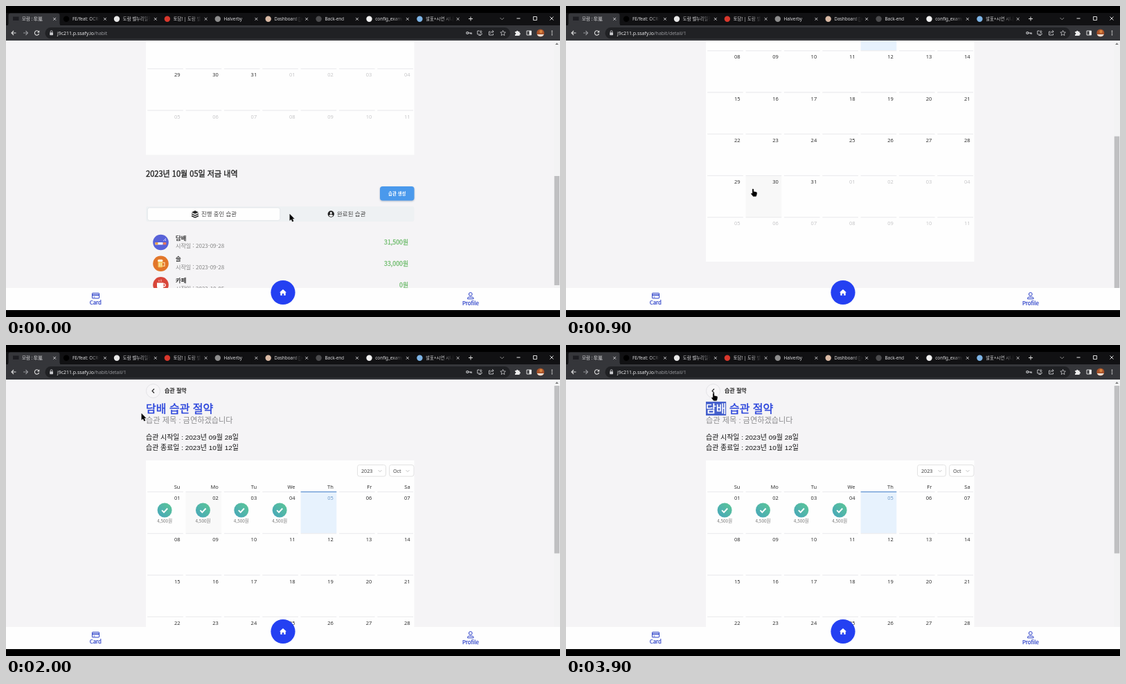
These frames come from a looping animation (800 px wide and 450 px high, 4 s). An HTML page:

```html
<!DOCTYPE html>
<html lang="ko">
<head>
<meta charset="utf-8">
<title>Habit savings</title>
<style>
html, body { margin: 0; width: 100%; height: 100%; overflow: hidden; background: #000; }
svg { display: block; width: 800px; height: 450px; }
text { font-family: 'Noto Sans CJK KR', 'Noto Sans', sans-serif; white-space: pre; }
.ui { font-family: 'Noto Sans', 'Noto Sans CJK KR', sans-serif; }
.doc { font-family: 'Liberation Sans', 'Noto Sans CJK KR', sans-serif; }
.raised { filter: drop-shadow(0 1px 1.2px rgba(40, 70, 110, .35)); }
</style>
</head>
<body>
<svg id="stage" viewBox="0 0 800 450" xmlns="http://www.w3.org/2000/svg"></svg>
<script>
const LOOP = 4000, STEP = 100;
const BLUE = '#2c46dc', NAV = '#2a3fc8', PAGE = '#f5f4f6', INK = '#222', STRIP = '#111113', BAR = '#35363a';

// Drawing helpers; text is placed by its vertical middle.
const rect = (x, y, w, h, fill, more = '') =>
  `<rect x="${x}" y="${y}" width="${w}" height="${h}" fill="${fill}" ${more}/>`;
const disc = (x, y, r, fill, more = '') =>
  `<circle cx="${x}" cy="${y}" r="${r}" fill="${fill}" ${more}/>`;
const line = (d, color, w = 1, more = '') =>
  `<path d="${d}" fill="none" stroke="${color}" stroke-width="${w}" ${more}/>`;
const fill = (d, color, more = '') => `<path d="${d}" fill="${color}" ${more}/>`;
const text = (x, y, size, str, color = INK, more = '') =>
  `<text x="${x}" y="${(y + size * 0.36).toFixed(2)}" font-size="${size}" fill="${color}" ${more}>${str}</text>`;
// Medium weight: regular glyphs with a hairline outline.
const medium = (x, y, size, str, color = INK, more = '') =>
  text(x, y, size, str, color, `stroke="${color}" stroke-width="${size * 0.03}" ${more}`);
const at = (x, y, body) => `<g transform="translate(${x} ${y})">${body}</g>`;
const END = 'text-anchor="end"', MID = 'text-anchor="middle"';
const UI = 'class="ui"', DOC = 'class="doc"';
const two = n => String(n).padStart(2, '0');

// Calendar grid, placed for the detail page at scroll 0.
const COL = 55.35, ROW = 60.25;
const cellX = c => 204.2 + c * COL;
const cellY = r => 212.5 + r * ROW;

function calendar(detail) {
  let s = rect(202, 167, 387.5, 411, '#fefefe');
  s += rect(507.5, 173.5, 41, 16.5, '#fff', 'rx="3" stroke="#e2e2e2"');
  s += rect(553.5, 173.5, 35.5, 16.5, '#fff', 'rx="3" stroke="#e2e2e2"');
  s += text(513, 182, 7.2, '2023', '#444', UI) + text(559, 182, 7.2, 'Oct', '#444', UI);
  for (const x of [540, 580]) s += line(`M${x - 2.5} 181l2.5 2.5 2.5-2.5`, '#bbb', 0.9);
  ['Su', 'Mo', 'Tu', 'We', 'Th', 'Fr', 'Sa'].forEach((d, c) => {
    s += text(cellX(c) + 47.3, 205, 7.5, d, '#333', UI + ' ' + END);
  });
  for (let i = 0; i < 42; i++) {
    const c = i % 7, x = cellX(c), y = cellY(i / 7 | 0);
    const now = i === 4, out = i > 30;
    if (now) s += rect(x, y, 51.7, 60, '#e7f2fd');
    if (detail && [1, 15, 29].includes(i)) s += rect(x, y, 51.7, 60, '#f5f5f5', `id="day${i + 1}" opacity="0"`);
    s += rect(x, y - 0.6, 51.7, 1.2, now ? '#5a8fd0' : '#ececee');
    s += text(x + 47.3, y + 9, 7.5, two(out ? i - 30 : i + 1),
      now ? '#6f9ccb' : out ? '#c6c6c8' : '#333', UI + ' ' + END);
    if (detail && i < 4) {
      const cx = x + 24.9;
      s += disc(cx, y + 26.5, 10.5, 'url(#mint)');
      s += line(`M${cx - 4} ${y + 26.7}l2.9 2.9 5.2-5.6`, '#fff', 1.9);
      s += text(cx, y + 42, 6.4, '4,500원', '#777', MID);
    }
  }
  return s;
}

const button = (x, y, w, label) =>
  rect(x, y, w, 20.6, '#4a99ec', 'rx="4" class="raised"') +
  text(x + w / 2, y + 10.3, 6.4, label, '#fff', MID + ' font-weight="700"');

const smoke = rect(-8, 0, 11, 3.4, '#fff') + rect(-8, 0, 4, 3.4, '#f0a24a') + rect(3.4, 0, 4.4, 3.4, '#e9775a') +
  line('M4-2c0-2 3-1 3-4M7-2v-2', '#cfd2ff', 0.9);
const beer = rect(-4, -4.5, 6.5, 10, '#f6c65a', 'rx="1"') + rect(-4.5, -6, 7.5, 3.4, '#fff4dc', 'rx="1.7"') +
  line('M2.5-1.5h3v5h-3M-2-1v5M.5-1v5', '#ffe9bd', 1.1);
const cup = fill('M-5.5-3h9.5v5c0 3-2 4-4.7 4s-4.8-1-4.8-4z', '#fff') +
  line('M4-1.5c4-.5 3.5 4.5-.3 4.2', '#fff', 1.2) + line('M-2.5-4.5v-2.5M.5-4.5v-3.2', '#ffd8d0', 0.9);

function habitPage() {
  let s = at(0, -362.7, calendar(false));
  s += medium(202, 243, 11.05, '2023년 10월 05일 저금 내역');
  s += button(540, 261, 49.5, '습관 생성');
  s += rect(202, 290, 387.5, 22, '#eef1f3', 'rx="3"');
  s += rect(204.3, 291.8, 191.5, 18.6, '#fefefe', 'rx="3" stroke="#dfe3e6" stroke-width=".8"');
  s += fill('M273 296l5 2.4-5 2.4-5-2.4zM268 300l5 2.4 5-2.4v1.6l-5 2.4-5-2.4zM268 302.8l5 2.4 5-2.4v1.6l-5 2.4-5-2.4z', INK);
  s += text(282, 301, 8.4, '진행 중인 습관', '#444');
  s += disc(469.3, 301, 4.7, INK) + disc(469.3, 299.4, 1.5, '#fff') +
    fill('M466.3 303.6c1-2.4 5-2.4 6 0-1.6 1.8-4.4 1.8-6 0z', '#fff');
  s += text(478, 301, 8.5, '완료된 습관', '#444');
  [['담배', '09-28', '31,500원', '#5862d8', smoke],
   ['술', '09-28', '33,000원', '#e2762a', beer],
   ['카페', '10-05', '0원', '#d8463a', cup]].forEach(([name, day, sum, color, icon], i) => {
    const y = 342 + i * 30.7;
    s += disc(223.5, y, 11.3, color) + at(223.5, y, icon);
    s += medium(245, y - 6.3, 8.3, name);
    s += text(245, y + 5.4, 8.05, '시작일 : 2023-' + day, '#858585');
    s += medium(581, y, 8.8, sum, '#6dbb6b', END);
  });
  return s + button(342.5, 425, 106.5, '오늘 습관으로 아낀 돈 저금하기');
}

function detailPage() {
  const title = color => medium(202, 92, 16, '담배 습관 절약', color);
  return disc(212.5, 66.5, 10, '#f7f6f8', 'stroke="#e3e3e6"') +
    line('M214 63.5l-3 3 3 3', INK, 1.1) +
    text(229, 66.3, 8, '습관 절약', INK, 'font-weight="700"') +
    title(BLUE) +
    `<g clip-path="url(#picked)">${rect(202, 82, 29.4, 20, '#4560cc')}${title('#fff')}</g>` +
    text(202, 109, 11.2, '습관 제목 : 금연하겠습니다', '#8c8c8e', DOC) +
    text(202, 133.7, 9.95, '습관 시작일 : 2023년 09월 28일', '#111', DOC) +
    text(202, 148.7, 9.95, '습관 종료일 : 2023년 10월 12일', '#111', DOC) +
    calendar(true);
}

const cross = (x, y, r, c) => line(`M${x - r} ${y - r}l${2 * r} ${2 * r}m0 ${-2 * r}l${-2 * r} ${2 * r}`, c, 0.9);

function tabs() {
  let s = rect(0, 0, 800, 10, '#000') + rect(0, 10, 800, 18, STRIP) + rect(0, 28, 800, 22, BAR);
  s += fill('M1 28.5q2.5-.5 2.5-3v-12q0-3 3-3h68q3 0 3 3v12q0 2.5 2.5 3z', BAR);
  [['모람 : 牟嵐', '#1d1d22'], ['FE/feat: OCR구현', '#000'], ['도람 벨누리일정', '#e8e8e8'],
   ['토담! | 도람 벨', '#d8372c'], ['Halverby', '#8d8d8d'], ['Dashboard [Jenkins]', '#d9b9a4'],
   ['Back-end', '#4a4a4c'], ['config_example', '#f2f2f2'], ['발표+시연 시나리오', '#7db4e6']].forEach(([name, color], i) => {
    const x = 14.2 + i * 72.9, end = x + 55.2 - i * 0.1;
    s += i === 0 ? rect(10, 15.5, 8.5, 5.5, color) : disc(x, 18.8, 4.2, color);
    s += text(x + 8.8, 18.6, 6.4, name, '#dcdcde', UI);
    if (i) s += rect(end - 21, 11, 15, 16, 'url(#fade)') + rect(end - 6.2, 11, 23, 16, STRIP);
    s += cross(end + 0.8, 18.8, 1.9, '#d6d6d8');
  });
  s += line('M668 18.5h6M671 15.5v6', '#ddd') + line('M713.5 17l2.8 2.8 2.8-2.8', '#999', 0.9);
  return s + line('M737.5 18h5', '#eee') + line('M761.5 15.5h5v5h-5z', '#eee', 0.9) + cross(788, 18, 2.5, '#eee');
}

function toolbar() {
  const g = '#c9cacd';
  let s = line('M14.5 39h-6.5m3-3l-3 3 3 3', '#ddd', 1.1) + line('M25 39h6.5m-3-3l3 3-3 3', '#929397', 1.1);
  s += line('M47.2 37.2a3.2 3.2 0 1 0 .4 2.8', '#ddd', 1.1) + fill('M48.3 35.2v3.3h-3.3z', '#ddd');
  s += rect(56.5, 31, 671.5, 16.5, '#202124', 'rx="8.2"');
  s += rect(63.2, 38.2, 4.8, 4, g, 'rx=".6"') + line('M64.2 38.5v-1.5a1.4 1.4 0 0 1 2.8 0v1.5', g, 0.8);
  s += text(74, 39, 6.95, 'j9c211.p.ssafy.io<tspan id="path" fill="#96979b"></tspan>', '#e8e8ea', UI);
  s += disc(666.3, 39, 1.5, 'none', `stroke="${g}" stroke-width="1.2"`) + line('M668 39h4.2v2M670.5 39v1.5', g, 1.1);
  s += line('M684 36h-3.2v5h6.4v-1.5M682.5 42.5h3.5M685.8 35v3.5m-1.7-1.5l1.7 1.7 1.7-1.7', g, 0.9);
  s += line('M699.5 37h-2v5h6v-2M699.5 40c.3-2.5 2-3 4.5-3m-1.8-1.8l2 1.8-2 1.8', g, 0.9);
  s += line('M717.6 35.4l1.1 2.5 2.7.2-2 1.8.6 2.7-2.4-1.4-2.4 1.4.6-2.7-2-1.8 2.7-.2z', g, 0.8);
  s += fill('M735 37h2a1.3 1.3 0 0 1 2.6 0h2v2a1.3 1.3 0 0 1 0 2.6v1.4h-6.6v-1.8a1.3 1.3 0 0 0 0-2.6z', '#eee');
  s += line('M752 36h6.5v6h-6.5z', '#eee', 0.9) + rect(755.5, 36, 3, 6, '#eee');
  s += disc(771.8, 39, 5.5, '#a9532a') + fill('M766.8 41a5.5 5.5 0 0 0 10 0z', '#eadfd6') + disc(772.5, 37, 2.2, '#d9843e');
  for (const y of [36.4, 39, 41.6]) s += disc(788.5, y, 0.85, '#ddd');
  return s;
}

function bottomNav() {
  let s = rect(0, 408, 800, 32, '#fefefe') + rect(0, 440, 800, 10, '#000');
  s += rect(124.5, 415.5, 10, 7.5, 'none', `rx=".6" stroke="${NAV}"`) +
    rect(124.5, 417.3, 10, 1.6, NAV) + line('M126 421h2.5', NAV, 0.8);
  s += medium(129.3, 429.6, 7.8, 'Card', NAV, MID);
  s += disc(670.8, 417, 2.4, 'none', `stroke="${NAV}"`) +
    line('M666.5 423.8v-.6q0-2 2-2h4.6q2 0 2 2v.6z', NAV, 1);
  s += medium(670.8, 430, 7.8, 'Profile', NAV, MID);
  s += disc(400, 414.5, 17.6, '#2440f2');
  return s + fill('M400 410l5 4.5h-1.3v4.3h-2.5v-2.8h-2.4v2.8h-2.5v-4.3h-1.3z', '#fff');
}

const pointers = {
  arrow: fill('M0 0v9l2.1-1.9 1.6 3.5 1.6-.7-1.6-3.4h2.7z', '#000', 'stroke="#000" stroke-width=".4"'),
  hand: fill('M-.8 0q.9-.8 1.7.2v3.3l3.8.8q1.1.4 1 1.6l-.6 3.2-.8 1.5h-4l-2.8-3.5q-.5-1.2.7-1.2l1 .7z', '#000', 'stroke="#000" stroke-width=".3"'),
  beam: line('M-2.3-4.5h1.8l.5.5.5-.5h1.8M0-4v8M-2.3 4.5h1.8l.5-.5.5.5h1.8', '#000', 1.1)
};

const $ = id => document.getElementById(id);
$('stage').innerHTML = `<defs>
  <linearGradient id="mint" x1="0" y1="1" x2="1" y2="0"><stop stop-color="#47a5bd"/><stop offset="1" stop-color="#5cc795"/></linearGradient>
  <linearGradient id="fade"><stop stop-color="${STRIP}" stop-opacity="0"/><stop offset="1" stop-color="${STRIP}"/></linearGradient>
  <clipPath id="picked"><rect id="pick" x="202" y="80" width="0" height="24"/></clipPath></defs>` +
  rect(0, 50, 800, 390, PAGE) +
  `<g id="habit">${habitPage()}</g><g id="detail">${detailPage()}</g>` +
  rect(791, 50, 9, 390, '#f3f3f4') + fill('M795.5 53.3l2.3 2.7h-4.6z', '#777') +
  rect(791.8, 59, 7.4, 100, '#bfbfc1', 'id="thumb"') + tabs() + toolbar() + bottomNav() +
  `<g id="pointer">${Object.entries(pointers).map(([k, v]) => `<g id="${k}">${v}</g>`).join('')}</g>`;

// Each track is a list of [time, ...values], blended smoothly in between.
const tracks = {
  move: [[0, 409.8, 301.3], [100, 404, 300], [500, 268, 268], [600, 263.8, 266.3], [900, 270, 265], [1200, 286, 258],
    [1400, 298.5, 255], [1600, 290, 238], [2000, 195.8, 99.3], [2300, 198, 101], [2700, 238, 105],
    [3000, 231, 93], [3300, 203, 93], [3600, 213, 70], [4000, 213, 70]],
  habit: [[0, 0], [100, 8], [400, 68]],
  detail: [[1100, 208], [1400, 90], [1700, 0]],
  day30: [[800, 0], [900, 0.6], [1000, 1], [1300, 1], [1400, 0.9], [1600, 0]],
  day16: [[1300, 0], [1400, 0.95], [1500, 1], [1700, 0]],
  day2: [[1500, 0], [1600, 1], [1800, 1], [2000, 0.5], [2200, 0]]
};

function sample(keys, t) {
  const i = keys.findIndex(k => k[0] > t);
  if (i === 0) return keys[0].slice(1);
  if (i < 0) return keys[keys.length - 1].slice(1);
  const a = keys[i - 1], b = keys[i];
  const u = (t - a[0]) / (b[0] - a[0]), e = u * u * (3 - 2 * u);
  return a.slice(1).map((v, n) => v + (b[n + 1] - v) * e);
}

function pointerKind(t) {
  if (t < 700) return 'arrow';
  if (t < 1800) return 'hand';
  if (t < 2400) return 'arrow';
  return t < 3500 ? 'beam' : 'hand';
}

const show = (id, on) => $(id).setAttribute('display', on ? 'inline' : 'none');
const shift = (id, x, y) => $(id).setAttribute('transform', `translate(${x.toFixed(2)} ${y.toFixed(2)})`);

function draw(t) {
  const onDetail = t >= 800;
  const [scroll] = sample(onDetail ? tracks.detail : tracks.habit, t);
  show('habit', !onDetail);
  show('detail', onDetail);
  shift(onDetail ? 'detail' : 'habit', 0, -scroll);
  $('path').textContent = onDetail ? '/habit/detail/1' : '/habit';
  $('thumb').setAttribute('y', onDetail ? 59 + scroll * 0.623 : 246 + scroll * 0.4);
  $('thumb').setAttribute('height', onDetail ? 242.5 : 158);
  for (const id of ['day2', 'day16', 'day30']) $(id).setAttribute('opacity', sample(tracks[id], t)[0]);
  $('pick').setAttribute('width', t < 3100 ? 0 : t < 3200 ? 14.7 : 29.4);
  $('pick').setAttribute('x', t < 3200 ? 216.7 : 202);
  const kind = pointerKind(t);
  for (const k in pointers) show(k, k === kind);
  shift('pointer', ...sample(tracks.move, t));
}

function tick() {
  const t = (performance.now() + 20) % LOOP;
  draw(Math.floor(t / STEP) * STEP);
  requestAnimationFrame(tick);
}
tick();
</script>
</body>
</html>
```
